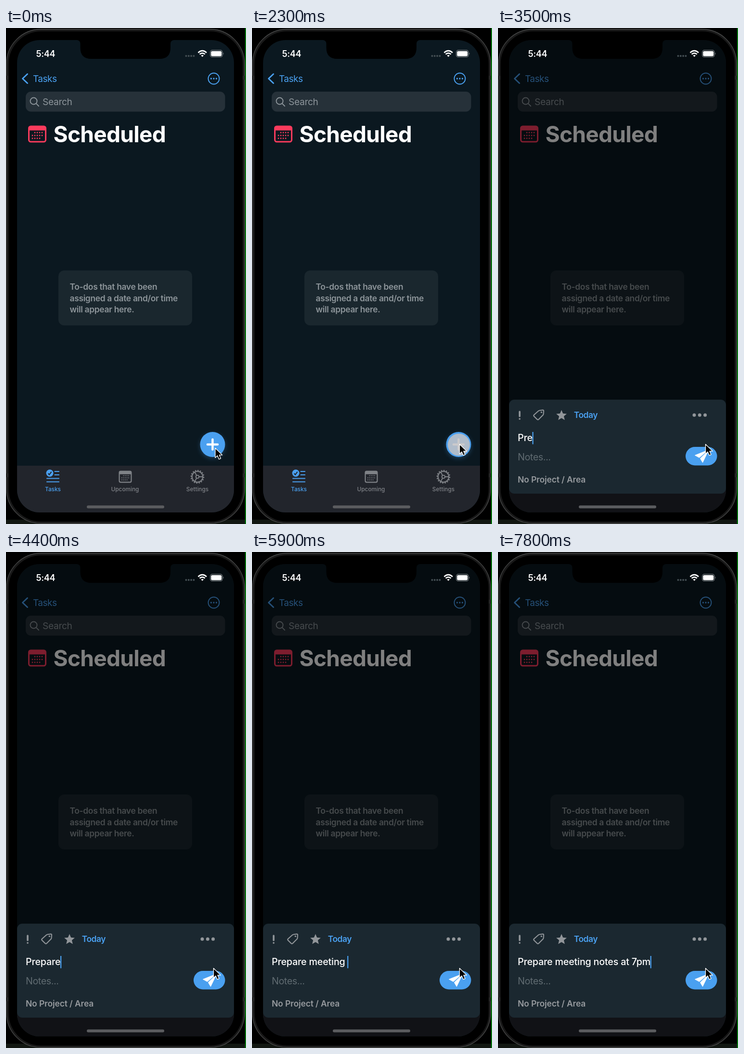
An HTML page that plays this animation: 499x1029 px, repeating every 8 s.

```html
<!DOCTYPE html>
<html lang="en">
<head>
<meta charset="utf-8">
<title>Scheduled tasks</title>
<style>
  html, body { margin: 0; width: 100%; height: 100%; overflow: hidden; background: #000; }
  svg { display: block; width: 499px; height: 1029px; }
  text { font-family: Inter, Roboto, sans-serif; font-optical-sizing: none; white-space: pre; }
  .blue { color: #4aa0f0; }
  .red { color: #fb3b5d; }
  .gray { color: #7f8287; }
  .f { fill: currentColor; }
  .s { fill: none; stroke: currentColor; stroke-linecap: round; stroke-linejoin: round; }
  .clock { font-size: 18px; font-weight: 600; letter-spacing: -.25px; fill: #fff; }
  .back { font-size: 19px; letter-spacing: -.5px; }
  .search { font-size: 19.2px; letter-spacing: -.35px; fill: #8d959b; }
  .title { font-size: 46px; font-weight: 700; letter-spacing: -.7px; fill: #fff; }
  .hint { font-size: 17.4px; font-weight: 600; letter-spacing: -.32px; fill: #8d959a; }
  .tab { font-size: 11.8px; font-weight: 500; text-anchor: middle; }
  .entry { font-size: 19.67px; font-weight: 500; letter-spacing: -.17px; fill: #fff; }
  .faint { fill: #606b71; }
  .notes { font-size: 19.67px; letter-spacing: -.4px; fill: #606b71; }
  .area { font-size: 17.4px; font-weight: 600; letter-spacing: -.08px; fill: #969a9e; }
  .today { font-size: 17.4px; font-weight: 600; letter-spacing: -.4px; }
  #sheet, #dim, #pressed { visibility: hidden; }
</style>
</head>
<body>
<svg viewBox="0 0 499 1029" xmlns="http://www.w3.org/2000/svg">
  <defs>
    <clipPath id="screen"><rect x="23" y="25" width="451" height="980" rx="47"/></clipPath>
    <filter id="glow" x="-50%" y="-50%" width="200%" height="200%"><feGaussianBlur stdDeviation="5"/></filter>
    <symbol id="cal" viewBox="0 0 38 35" overflow="visible">
      <rect class="s" x="1.5" y="1.5" width="35" height="32" rx="4" stroke-width="3"/>
      <path class="f" d="M1 10V5Q1 1 5 1H33Q37 1 37 5V10Z"/>
      <path class="s" stroke-width="2.8" d="M14 14.5h0m5 0h0m5 0h0m5 0h0M9 20.5h0m5 0h0m5 0h0m5 0h0m5 0h0M9 26.5h0m5 0h0m5 0h0m5 0h0"/>
    </symbol>
  </defs>

  <!-- phone body -->
  <rect width="499" height="1029"/>
  <rect y="1020" width="499" height="9" fill="#121712"/>
  <rect x="3.5" y="5" width="490.5" height="1021" rx="70" fill="#000" stroke="#191919" stroke-width="4"/>
  <rect x="1" y="2.5" width="495" height="1025.5" rx="72" fill="none" stroke="#4b4c4c" stroke-width="1.3"/>
  <path d="M0 99h5v8H0zM492 99h5v8h-5zM0 924h5v8H0zM492 924h5v8h-5z" fill="#252525"/>
  <rect x="497" width="2" height="1029" fill="#04780c"/>

  <g clip-path="url(#screen)">
    <rect x="23" y="25" width="451" height="980" fill="#0b1820"/>

    <g class="blue">
      <path class="s" stroke-width="2.9" d="M44.5 95.5L34.5 105L44.5 114.5"/>
      <text class="back f" x="56" y="112">Tasks</text>
      <circle class="s" cx="432" cy="105" r="11.5" stroke-width="1.9"/>
      <path class="s" stroke-width="3.3" d="M426.5 105h0m5.5 0h0m5.5 0h0"/>
    </g>

    <rect x="41" y="132" width="414.5" height="41.5" rx="11" fill="#263139"/>
    <path class="s" style="color:#8d959b" stroke-width="1.9" d="M64.5 151.5a7 7 0 1 1-14 0a7 7 0 1 1 14 0M62.7 156.7L68 162"/>
    <text class="search" x="76" y="160">Search</text>

    <use class="red" href="#cal" x="46" y="202.5" width="38" height="35"/>
    <text class="title" x="98.5" y="236.5">Scheduled</text>

    <rect x="109" y="503" width="278" height="114" rx="12" fill="#1a272e"/>
    <text class="hint" x="132.5" y="543.3">To-dos that have been</text>
    <text class="hint" x="132.5" y="566.5">assigned a date and/or time</text>
    <text class="hint" x="132.5" y="589.7">will appear here.</text>

    <rect x="23" y="908" width="451" height="97" fill="#22252c"/>
    <g class="blue">
      <circle class="f" cx="91" cy="923.5" r="7.5"/>
      <path d="M87.5 924l2.5 2.7l4.500-6" fill="none" stroke="#22252c" stroke-width="2"/>
      <path class="s" stroke-width="2.2" d="M101.5 920H110M101.5 927H110M85 934.5H110M85 941.5H110"/>
      <text class="tab f" x="97.5" y="961.3">Tasks</text>
    </g>
    <g class="gray">
      <use href="#cal" x="234.5" y="918.5" width="27" height="25"/>
      <text class="tab f" x="247.5" y="961.3">Upcoming</text>
      <circle class="s" cx="398" cy="931" r="11.2" stroke-width="2"/>
      <circle cx="398" cy="931" r="13.2" fill="none" stroke="currentColor" stroke-width="2.2" pathLength="64" stroke-dasharray="2 2"/>
      <circle class="s" cx="398" cy="931" r="3.2" stroke-width="1.8"/>
      <path class="s" stroke-width="1.8" d="M401.5 931H409M396.2 928L392.5 921.5M396.2 934L392.5 940.5"/>
      <text class="tab f" x="398" y="961.3">Settings</text>
    </g>

    <g id="add">
      <circle cx="429.5" cy="867" r="26" fill="#4aa0f0" opacity=".28" filter="url(#glow)"/>
      <circle cx="429.5" cy="864" r="26" fill="#4aa0f0"/>
      <path d="M419 864h21M429.5 853.5v21" stroke="#fff" stroke-width="4.5" stroke-linecap="round"/>
      <circle id="pressed" cx="430" cy="864.5" r="23" fill="#c2c1c4" fill-opacity=".85"/>
    </g>

    <rect id="dim" x="23" y="25" width="451" height="980" fill-opacity=".5"/>

    <g id="sheet">
      <rect x="23" y="771" width="451" height="195" rx="11" fill="#1b2830"/>
      <g style="color:#92969a">
        <path class="s" stroke-width="3.6" d="M45 796v9.5M45 811h0"/>
        <path class="s" stroke-width="2.1" d="M86 793.5L93 792.5Q95 792.5 95 794.5L94.5 801Q94.4 802 93.5 803L84.5 812Q83 813.5 81.5 812L74.8 805.5Q73.5 804 75 802.5L84 794.5Q85 793.6 86 793.5Z"/>
        <circle class="f" cx="90.3" cy="797.2" r="1.6"/>
        <path id="star" class="f"/>
        <path class="s" stroke-width="7" d="M408 803h0m11.3 0h0m11.3 0h0"/>
      </g>
      <text class="today blue f" x="157.7" y="809">Today</text>
      <text id="entry" class="entry" x="41" y="857.2"></text>
      <rect id="caret" class="blue f" y="838" width="2.2" height="25.5"/>
      <text class="notes" x="41" y="897">Notes...</text>
      <text class="area" x="41" y="943.3">No Project / Area</text>
      <rect id="send" x="390" y="869" width="65.5" height="38.5" rx="19.25"/>
      <path d="M437 875.5L409.5 886.5L418.5 891.3ZM437.5 876.5L420.5 893L425.5 901.5Z" fill="#fff" stroke="#fff" stroke-width="1" stroke-linejoin="round"/>
    </g>

    <rect x="168" y="990.5" width="161" height="6" rx="3" fill="#5b5c5f"/>

    <!-- notch and status bar -->
    <path d="M148 25Q154.5 26 154.5 33V41Q154.5 64 177.5 64H319Q342 64 342 41V33Q342 26 348.5 25Z"/>
    <text class="clock" x="62.5" y="60.3">5:44</text>
    <path class="s" style="color:#444e53" stroke-width="4" d="M374.5 58h0m5.3 0h0m5.3 0h0m5.3 0h0"/>
    <g fill="none" stroke="#fff" stroke-width="2.7">
      <path d="M399.5 51.2Q408.2 43.2 417 51.2M402.7 54.6Q408.2 49.6 413.7 54.6"/>
      <path d="M405.5 57Q408.2 54.8 411 57L408.2 60Z" fill="#fff" stroke="none"/>
    </g>
    <rect x="424.7" y="46.2" width="25.3" height="14" rx="4" fill="none" stroke="#7d8488" stroke-width="1.2"/>
    <rect x="426.3" y="47.9" width="22" height="10.6" rx="2.5" fill="#fff"/>
    <path d="M451.5 51Q453.5 53.2 451.5 55.5Z" fill="#7d8488"/>
  </g>

  <path id="pointer" d="M0 0V20L4.600 15.800L7.800 23.200L11.500 21.600L8.500 14.400H14.700Z" fill="#000" stroke="#fff" stroke-width="1.3" stroke-linejoin="round"/>
</svg>
<script>
  const LOOP = 8000, OPEN = 2400;
  const $ = id => document.getElementById(id);
  const [entry, caret, send, sheet, dim, pressed, add, pointer] =
    ['entry', 'caret', 'send', 'sheet', 'dim', 'pressed', 'add', 'pointer'].map($);

  const message = 'Prepare meeting notes at 7pm';
  // when each keystroke lands, in tenths of a second
  const keys = [32, 34, 35, 37, 40, 42, 44, 49, 51, 51, 54, 55, 56, 57, 58, 59,
                61, 62, 63, 64, 66, 68, 70, 70, 72, 74, 77, 78];

  const star = Array.from({ length: 10 }, (_, i) => {
    const r = i % 2 ? 5.2 : 11.5, a = i * Math.PI / 5 - Math.PI / 2;
    return (132 + r * Math.cos(a)).toFixed(1) + ' ' + (804 + r * Math.sin(a)).toFixed(1);
  });
  $('star').setAttribute('d', 'M' + star.join('L') + 'Z');

  const show = (el, on) => { el.style.visibility = on ? 'visible' : 'hidden'; };
  const ease = p => p * p * (3 - 2 * p);
  let shown = -1;

  function type(n) {
    if (n === shown) return;
    shown = n;
    entry.textContent = n ? message.slice(0, n) : 'Assignment due next friday...';
    entry.classList.toggle('faint', !n);
    caret.setAttribute('x', 41 + (n ? entry.getComputedTextLength() - .5 : 0));
    send.setAttribute('fill', n ? '#4aa0f0' : '#89898b');
  }

  function draw() {
    const t = performance.now() % LOOP;
    const open = t >= OPEN;
    const p = ease(Math.min(1, Math.max(0, (t - 600) / 600)));
    pointer.setAttribute('transform', `translate(${435 - 3.5 * p} ${871.5 - 8 * p})`);
    show(pressed, t >= 2300 && !open);
    show(add, !open);
    show(dim, open);
    show(sheet, open);
    type(keys.filter(k => t >= k * 100).length);
    requestAnimationFrame(draw);
  }
  draw();
</script>
</body>
</html>
```
